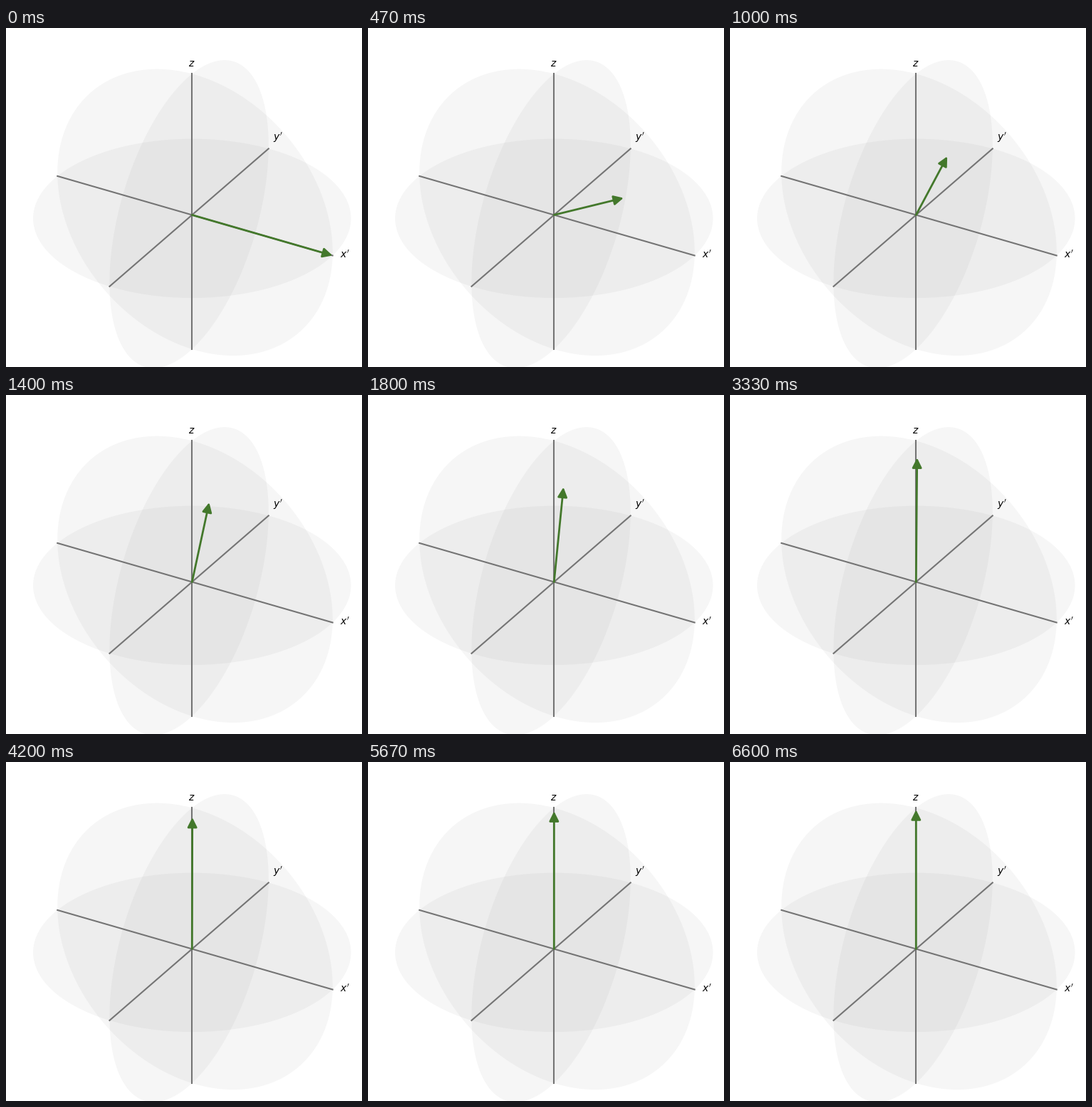
Animation of 500x476 px, one loop 6.67 s. Source, as a matplotlib script:

```python
import numpy as np
import matplotlib.pyplot as plt
from matplotlib.animation import FuncAnimation
from matplotlib.patches import FancyArrowPatch, Polygon

W, H, DPI = 500, 476, 100
FRAMES, LOOP_MS = 100, 6670
CENTER = np.array([261.3, 262.5])
RADIUS = 223.0          # sphere radius in pixels
PERSPECTIVE = 0.05
ELEV, AZIM = np.radians(30), np.radians(-60)
T1, T2 = 22.75, 10.0    # relaxation times in frames

plt.rcParams["mathtext.fontset"] = "dejavusans"


def project(x, y, z):
    """Perspective view of a point in the unit sphere, in stage pixels."""
    toward = x * np.cos(AZIM) + y * np.sin(AZIM)
    right = y * np.cos(AZIM) - x * np.sin(AZIM)
    up = z * np.cos(ELEV) - toward * np.sin(ELEV)
    depth = toward * np.cos(ELEV) + z * np.sin(ELEV)
    scale = RADIUS / (1 - PERSPECTIVE * depth)
    return CENTER[0] + right * scale, CENTER[1] - up * scale


fig = plt.figure(figsize=(W / DPI, H / DPI), dpi=DPI, facecolor="white")
ax = fig.add_axes([0, 0, 1, 1])
ax.set_xlim(0, W)
ax.set_ylim(H, 0)
ax.axis("off")

# Coordinate planes as translucent discs
a = np.linspace(0, 2 * np.pi, 361)
c, s, o = np.cos(a), np.sin(a), np.zeros_like(a)
for circle in ((c, s, o), (c, o, s), (o, c, s)):
    ax.add_patch(Polygon(np.column_stack(project(*circle)),
                         facecolor="gray", alpha=0.07, linewidth=0))

for axis in np.eye(3):
    (x0, y0), (x1, y1) = project(*-axis), project(*axis)
    ax.plot([x0, x1], [y0, y1], color="#747474", lw=1.5, zorder=2)

for label, x, y, ha in (("$x'$", 468.7, 322.7, "left"),
                        ("$y'$", 374.7, 158.2, "left"),
                        ("$z$", 261.0, 53.7, "center")):
    ax.text(x, y, label, fontsize=10, ha=ha, va="baseline", color="black")

arrow = FancyArrowPatch(tuple(CENTER), project(1, 0, 0), arrowstyle="-|>",
                        mutation_scale=20, lw=2, color="#43782b",
                        shrinkA=0, shrinkB=0, zorder=3)
ax.add_patch(arrow)


def update(i):
    tip = project(np.exp(-i / T2), 0, 1 - np.exp(-i / T1))
    arrow.set_positions(tuple(CENTER), tip)
    return (arrow,)


anim = FuncAnimation(fig, update, frames=FRAMES, interval=LOOP_MS / FRAMES,
                     repeat=True, repeat_delay=0)
plt.show()
```
